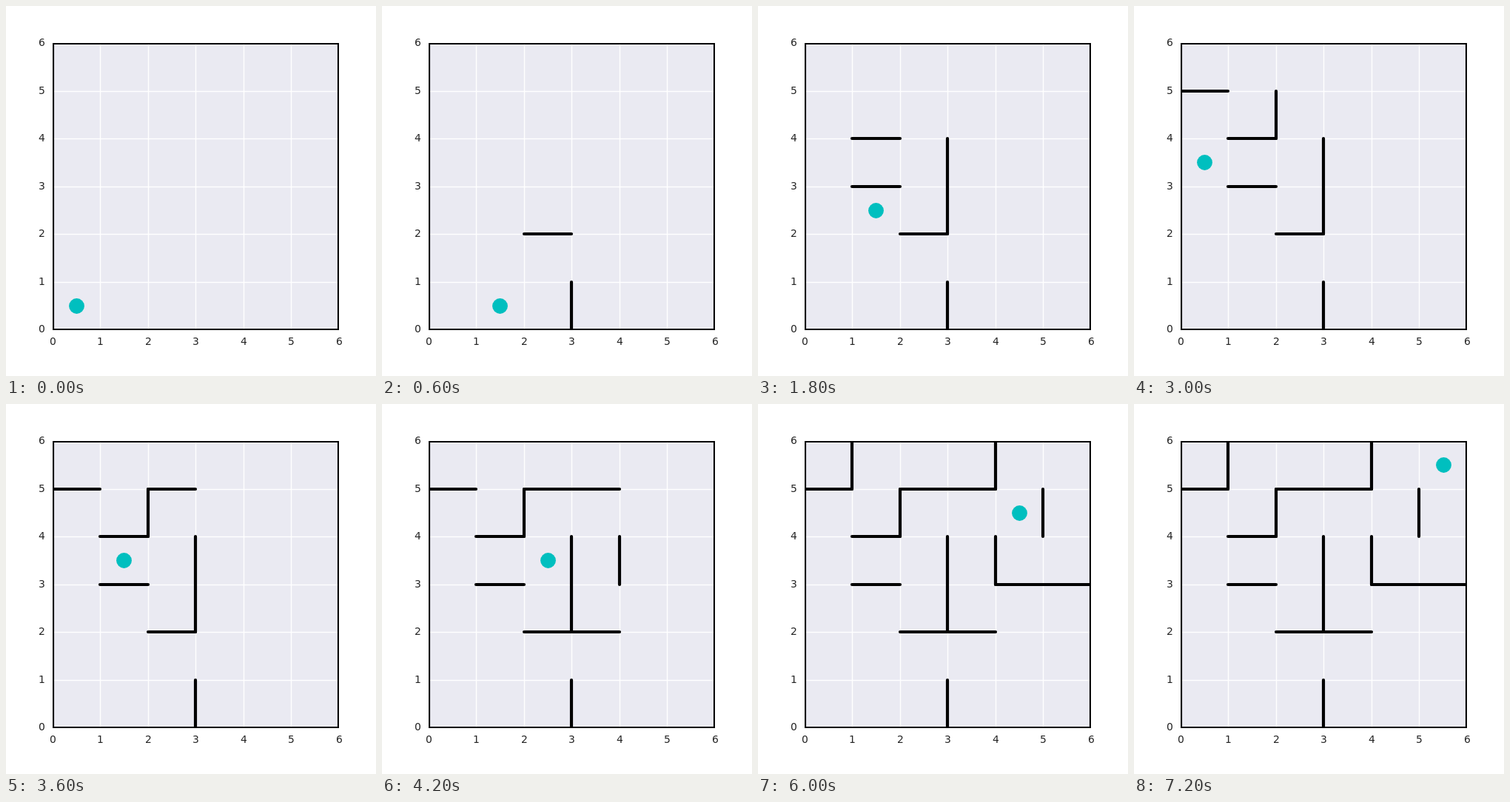
Write an HTML page with a canvas that moves like this. It is 500 px wide and 500 px high and loops after 9200 ms.

```html
<!DOCTYPE html>
<html lang="en">
<head>
<meta charset="utf-8">
<title>Maze walk</title>
<style>
  html, body { margin: 0; width: 100%; height: 100%; overflow: hidden; background: #fff; }
  canvas { display: block; }
</style>
</head>
<body>
<canvas id="stage" width="500" height="500"></canvas>
<script>
const ctx = document.getElementById('stage').getContext('2d');
const STEP = 600, LOOP = 9200, SIZE = 6, CELL = 387.5 / SIZE;
const WALL = 4.17, DOT = 10.42;

// Maze coordinates to the stage, y pointing up
const toX = x => 62.5 + x * CELL;
const toY = y => 50 + (SIZE - y) * CELL;
const px = x => Math.round(toX(x));
const py = y => Math.round(toY(y));

// The walk, one move per step: right, left, up
const path = [{ x: 0, y: 0 }];
for (const move of 'RUULURRURRUR') {
  const { x, y } = path.at(-1);
  path.push({ x: x + (move === 'R') - (move === 'L'), y: y + (move === 'U') });
}

// Unit walls by their lower left end
const parse = (text, dx, dy) => text.split(' ').map(([x, y]) => ({ x: +x, y: +y, dx, dy }));
const walls = [
  ...parse('22 32 13 43 53 14 05 25 35', 1, 0),
  ...parse('30 32 33 43 24 54 15 45', 0, 1)
];

// A wall is found once it borders a cell next to the walker
for (const wall of walls) {
  const { x, y, dx, dy } = wall;
  wall.found = path.findIndex(cell =>
    Math.abs(x + dx / 2 - cell.x - 0.5) <= 1.5 &&
    Math.abs(y + dy / 2 - cell.y - 0.5) <= 1.5);
}

function drawLabels() {
  ctx.fillStyle = '#262626';
  ctx.font = '13.89px "DejaVu Sans", sans-serif';
  for (let i = 0; i <= SIZE; i++) {
    ctx.fillText(i, Math.round(toX(i) - 4), 458);
    ctx.fillText(i, 44, Math.round(toY(i) + 3.95));
  }
}

function drawGrid() {
  ctx.fillStyle = '#eaeaf2';
  ctx.fillRect(63, 50, 387, 388);
  ctx.fillStyle = '#fff';
  for (let i = 1; i < SIZE; i++) {
    ctx.fillRect(px(i) - 0.195, 50, 1.39, 388);
    ctx.fillRect(63, py(i) - 0.195, 387, 1.39);
  }
}

function drawWall({ x, y, dx, dy }) {
  const left = px(x), top = py(y + dy);
  ctx.beginPath();
  ctx.roundRect(left - WALL / 2, top - WALL / 2,
    px(x + dx) - left + WALL, py(y) - top + WALL, WALL / 2);
  ctx.fill();
}

function drawWalls(step) {
  ctx.fillStyle = '#000';
  for (const end of [0, SIZE]) {
    drawWall({ x: 0, y: end, dx: SIZE, dy: 0 });
    drawWall({ x: end, y: 0, dx: 0, dy: SIZE });
  }
  walls.filter(wall => wall.found <= step).forEach(drawWall);
}

function drawDot({ x, y }) {
  ctx.fillStyle = '#00bfbf';
  ctx.beginPath();
  ctx.arc(px(x + 0.5) + 0.5, py(y + 0.5) + 0.5, DOT, 0, Math.PI * 2);
  ctx.fill();
}

function draw() {
  const time = performance.now() % LOOP;
  const step = Math.min(Math.floor(time / STEP), path.length - 1);
  ctx.clearRect(0, 0, 500, 500);
  drawLabels();
  ctx.save();
  ctx.beginPath();
  ctx.rect(63, 50, 387, 388);
  ctx.clip();
  drawGrid();
  drawWalls(step);
  drawDot(path[step]);
  ctx.restore();
  requestAnimationFrame(draw);
}
draw();
</script>
</body>
</html>
```
